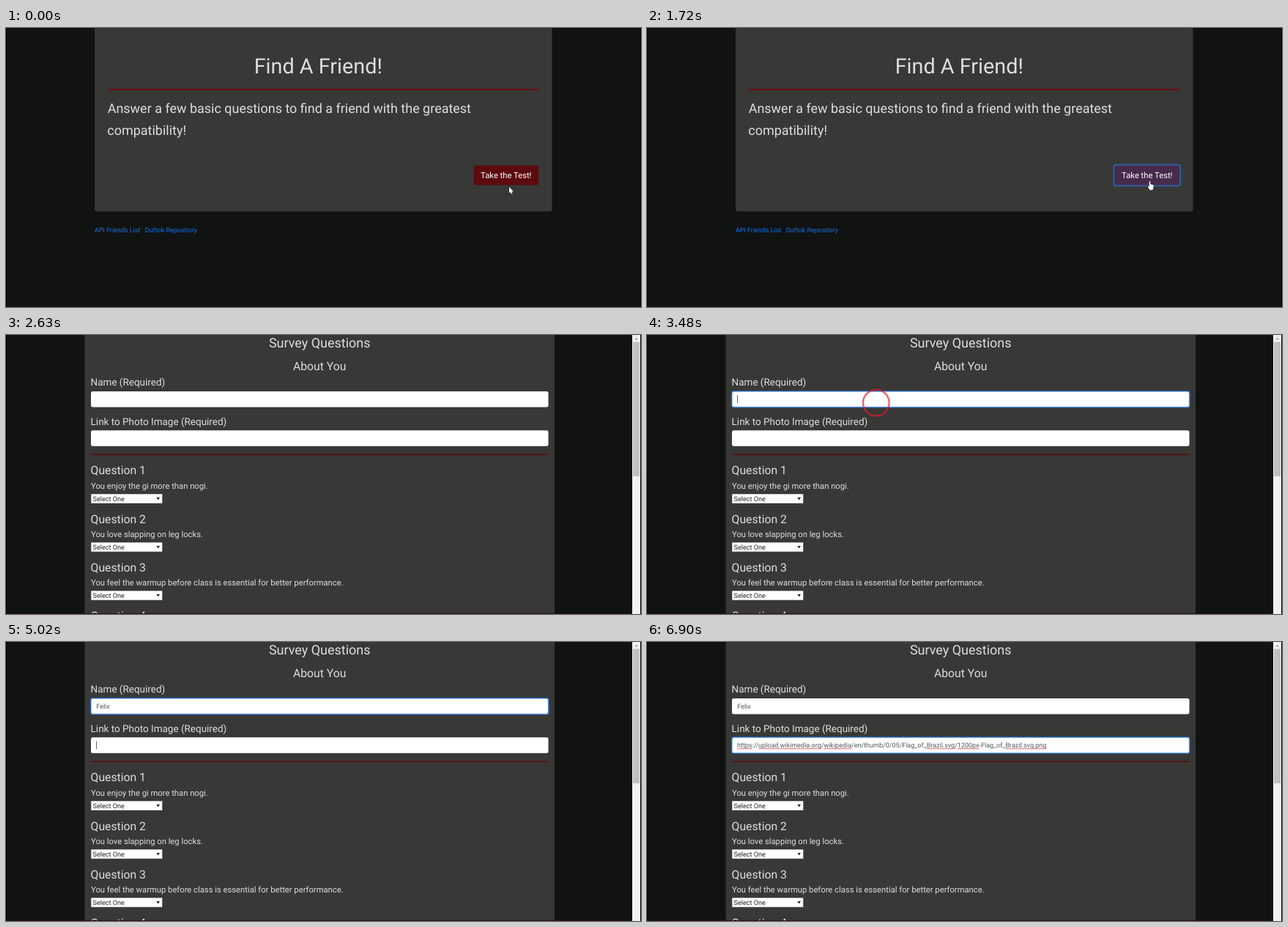
Write an HTML page with a canvas that moves like this. It is 867 px wide and 381 px high and loops after 8000 ms.

```html
<!DOCTYPE html>
<html lang="en">
<head>
<meta charset="utf-8">
<title>Find A Friend</title>
<style>
  html, body { margin: 0; width: 100%; height: 100%; overflow: hidden; background: #111; }
  canvas { display: block; }
</style>
</head>
<body>
<canvas id="stage" width="867" height="381"></canvas>
<script>
const LOOP = 8000;
const ctx = document.getElementById('stage').getContext('2d');
ctx.textRendering = 'geometricPrecision';

const PANEL = '#383836', PALE = '#dededc', INK = '#50565c';
const FIELD = { x: 116, w: 624.5, h: 21.5 };
const NAME_Y = 77, LINK_Y = 130.3;
const NAME = 'Felix';
// Odd parts carry the spell-check underline.
const LINK = ['', 'https', '://', 'upload.wikimedia.org', '/', 'wikipedia',
  '/en/thumb/0/05/Flag_of_', 'Brazil.svg', '/', '1200px', '-Flag_of_', 'Brazil.svg.png'];
const QUESTIONS = [
  'You enjoy the gi more than nogi.',
  'You love slapping on leg locks.',
  'You feel the warmup before class is essential for better performance.',
  ''
];

const during = (t, from, to) => t >= from && t < to;

function rect(x, y, w, h, color) {
  ctx.fillStyle = color;
  ctx.fillRect(x, y, w, h);
}

function box(x, y, w, h, r, color) {
  ctx.beginPath();
  ctx.roundRect(x, y, w, h, r);
  ctx.fillStyle = color;
  ctx.fill();
}

function text(str, x, y, size, color = PALE, align = 'left') {
  ctx.font = `${size}px Roboto, sans-serif`;
  ctx.textAlign = align;
  ctx.fillStyle = color;
  ctx.fillText(str, x, y);
  return ctx.measureText(str).width;
}

function shape(points, color, outline) {
  ctx.beginPath();
  points.forEach(([x, y]) => ctx.lineTo(x, y));
  ctx.closePath();
  if (outline) {
    ctx.strokeStyle = outline;
    ctx.lineWidth = 1;
    ctx.stroke();
  }
  ctx.fillStyle = color;
  ctx.fill();
}

function arrowCursor(x, y) {
  ctx.save();
  ctx.translate(x, y);
  shape([[0, 0], [0, 8.6], [1.9, 6.9], [3.2, 9.8], [4.6, 9.2], [3.4, 6.4], [5.9, 6.2]], '#fff', '#111');
  ctx.restore();
}

function handCursor(x, y) {
  ctx.save();
  ctx.translate(x, y);
  shape([[2, 0], [3.3, 0], [3.6, 4], [7.4, 5], [8, 6], [7.4, 9.6], [6.6, 12],
    [2.6, 12], [0, 7.6], [0.5, 6.6], [1.9, 7.4]], '#fff', '#222');
  ctx.restore();
}

function clickRing(x, y) {
  ctx.beginPath();
  ctx.arc(x, y, 17.8, 0, 2 * Math.PI);
  ctx.strokeStyle = 'rgba(222, 30, 50, .68)';
  ctx.lineWidth = 2.4;
  ctx.stroke();
}

function backdrop() {
  rect(0, 0, 867, 381, '#111212');
  rect(0, 0, 1, 381, '#000');
  rect(866, 0, 1, 381, '#000');
  rect(0, 380, 867, 1, '#200c10');
}

function home(t) {
  box(121, -5, 624.5, 255.5, 3, PANEL);
  text('Find A Friend!', 338.7, 62.3, 28.77);
  rect(139, 83, 588.5, 2, '#6c0d11');
  text('Answer a few basic questions to find a friend with the greatest', 138.7, 115.8, 17.98);
  text('compatibility!', 138.3, 146.4, 17.98);
  text('API Friends List', 120.8, 278.5, 8.99, '#1273ea');
  text('Duftok Repository', 189.7, 278.5, 8.99, '#1273ea');

  if (t >= 1570) box(636.5, 185.8, 92.6, 30.6, 4, '#2b5f9f');
  box(638.5, 187.8, 88.6, 26.6, 3, t < 100 ? '#5c0a0e' : t < 170 ? '#511a2c' : '#472b4b');
  text('Take the Test!', 682.8, 205.2, 11.24, '#fff', 'center');
  if (t < 100) arrowCursor(687, 217);
  else handCursor(683.8, 209.3);
  if (during(t, 940, 1570)) clickRing(686.5, 209.5);
}

function field(y, focused) {
  const { x, w, h } = FIELD;
  if (focused) {
    box(x - 1.3, y - 1.3, w + 2.6, h + 2.6, 3.5, '#2c5a98');
    box(x, y, w, h, 2.5, '#80b8f4');
    box(x + .7, y + .7, w - 1.4, h - 1.4, 2, '#fff');
  } else {
    box(x, y, w, h, 2.5, '#fff');
  }
}

function caret(x, fieldY) {
  rect(Math.round(x), fieldY + 5, 1, 11, '#666');
}

function nameField(t) {
  field(NAME_Y, during(t, 3480, 5150));
  const typed = t < 4010 ? 0 : t < 4510 ? 1 : t < 4660 ? 2 : t < 4840 ? 4 : 5;
  const width = text(NAME.slice(0, typed), 123.3, 91, 8.99, INK);
  if (during(t, 3160, 4840)) caret(123 + width, NAME_Y);
}

function linkField(t) {
  field(LINK_Y, t >= 5150);
  if (during(t, 5020, 5620) || during(t, 6000, 6160)) caret(123, LINK_Y);
  if (t < 6690) return;
  let x = 123;
  LINK.forEach((part, i) => {
    const width = text(part, x, 144.2, 8.99, INK);
    if (t >= 6900 && i % 2) rect(x, 145.2, width, 1, '#e0646a');
    x += width;
  });
}

function question(statement, i) {
  const y = i * 66.1;
  text(`Question ${i + 1}`, 115.6, 190.4 + y, 15.74);
  if (!statement) return;
  text(statement, 116, 209.8 + y, 11.24);
  rect(116, 217 + y, 97.5, 13, '#a9a9a9');
  rect(116.6, 217.6 + y, 96.3, 11.8, '#fff');
  text('Select One', 118.6, 226.8 + y, 9.1, '#222');
  shape([[205.4, 221.8 + y], [210, 221.8 + y], [207.7, 225.4 + y]], '#222');
}

function scrollbar() {
  rect(855, 0, 11, 381, '#f1f1f1');
  rect(856, 9.5, 9, 183.5, '#c1c1c1');
  shape([[858.2, 6.3], [863, 6.3], [860.6, 3.6]], '#a3a3a3');
}

function survey(t) {
  rect(107.5, 0, 641.5, 381, PANEL);
  text('Survey Questions', 428.2, 17.2, 17.98, PALE, 'center');
  text('About You', 428.2, 48, 15.74, PALE, 'center');
  text('Name (Required)', 115.6, 69, 13.49);
  text('Link to Photo Image (Required)', 115.6, 122.6, 13.49);
  nameField(t);
  linkField(t);
  rect(116, 162.5, 624.5, 1.6, '#5c0c0f');
  QUESTIONS.forEach(question);
  scrollbar();
  rect(0, 380, 855, 1, '#2a1216');

  if (t < 2090) handCursor(683.8, 209.3);
  else if (t < 2490) arrowCursor(683, 210);
  else if (during(t, 2880, 3020)) arrowCursor(313.5, 110.5);
  if (during(t, 3160, 3610)) clickRing(312.8, 92.5);
}

function draw(now) {
  const t = now % LOOP;
  backdrop();
  (t < 1850 ? home : survey)(t);
  requestAnimationFrame(draw);
}

const start = performance.now();
draw(0);
function draw0() {}
</script>
</body>
</html>
```
